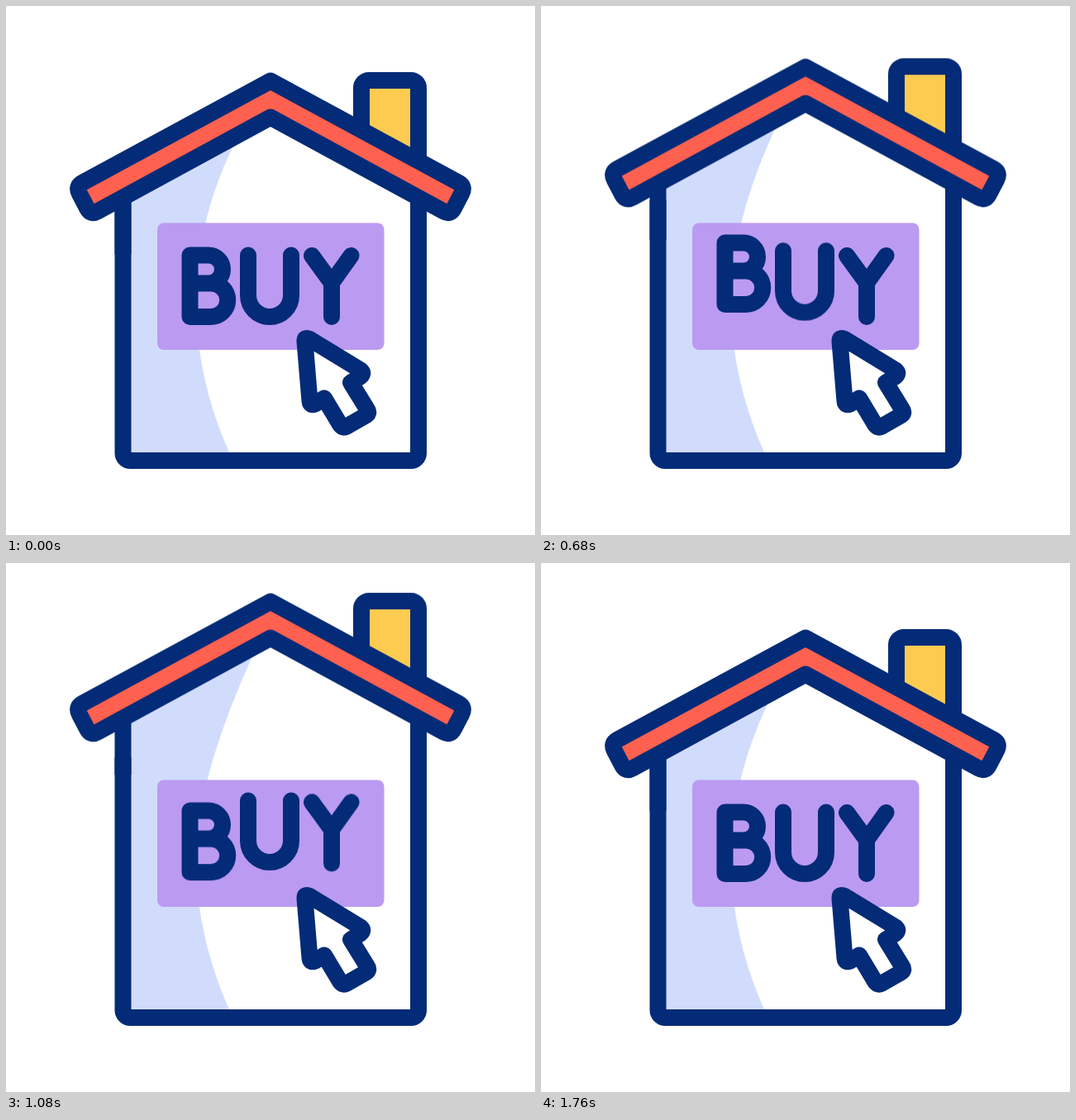
Write an HTML page without scripts that moves like this. It is 640 px wide and 640 px high and loops after 1960 ms.

```html
<!DOCTYPE html>
<html lang="en">
<head>
<meta charset="utf-8">
<title>Buy a house</title>
<style>
  html, body { margin: 0; width: 100%; height: 100%; overflow: hidden; background: #fff; }
  svg { display: block; width: 100%; height: 100%; }

  .line { fill: none; stroke: #042b77; stroke-width: 20; stroke-linecap: round; stroke-linejoin: round; }
  .flat { stroke-linecap: butt; }
  .red { fill: #ff6150; }
  .yellow { fill: #fdcb50; }
  .white { fill: #fff; }

  .move {
    --rise: -16px;
    animation: 1960ms cubic-bezier(.333, 0, .667, 1) infinite;
  }
  .roof { --rise: -50px; }
  .roof, .u { animation-name: lift; }
  .b { animation-name: lift-early; }
  .y { animation-name: lift-late; }
  .shade { fill: #d1dcfd; animation-name: stretch; }
  .cursor { transform-origin: 362px 402px; vector-effect: non-scaling-stroke; animation-name: click; }

  @keyframes lift {
    0%, 25%, 73.3%, 100% { transform: translateY(0); }
    50.1% { transform: translateY(var(--rise)); }
  }
  @keyframes lift-early {
    0%, 14.8%, 59.4%, 100% { transform: translateY(0); }
    38.3%, 39.3% { transform: translateY(var(--rise)); }
  }
  @keyframes lift-late {
    0%, 40.8%, 88.8%, 100% { transform: translateY(0); }
    61.2%, 65.3% { transform: translateY(var(--rise)); }
  }
  @keyframes click {
    0%, 4.1%, 28.6%, 100% { transform: scale(1); }
    16.3% { transform: scale(.7); }
  }
  @keyframes stretch {
    0%, 25%, 73.3%, 100% { d: path("M141 545H272L270 540Q230 450 230 358Q230 263 274 171L279 160L141 235Z"); }
    50.1% { d: path("M141 545H272L270 540Q230 450 230 358Q230 265 299 110L304 98L141 185Z"); }
  }
</style>
</head>
<body>
<svg viewBox="0 0 640 640" role="img" aria-label="House with a BUY button">
  <path class="move shade" d="M141 545H272L270 540Q230 450 230 358Q230 263 274 171L279 160L141 235Z"/>
  <rect x="183" y="262.5" width="274.5" height="153.5" rx="8" fill="#bb9af2"/>

  <path class="line flat" d="M141.5 235V541a9 9 0 0 0 9 9H490a9 9 0 0 0 9-9V235"/>
  <g class="move roof">
    <path class="line flat" d="M141.5 225V300M499 225V300"/>
    <path class="line flat yellow" d="M430 155V99a9 9 0 0 1 9-9H490a9 9 0 0 1 9 9V190"/>
    <path class="line red" d="M320 90.6L547.7 213.9Q555.6 218.2 551.4 226.5L541.7 245Q537.5 253 529.6 248.6L320 134.6L110.4 248.6Q102.5 253 98.3 245L88.6 226.5Q84.4 218.2 92.3 213.9Z"/>
  </g>

  <g class="line">
    <path class="move b" d="M222.5 335.5V301.5H245a17 17 0 0 1 0 34H222.5H248a20.2 20.2 0 0 1 0 40.4H222.5Z"/>
    <path class="move u" d="M293 301.5V350a26 26 0 0 0 52 0V301.5"/>
    <path class="move y" d="M370 302L394 335L417.5 302M394 335V376"/>
  </g>

  <path class="line white move cursor" d="M361.5 406Q361 400 367 402.8L429 440.5Q434 444.5 428 449L417 455.5L437 488Q440 492 436 495L411.5 509Q407.5 511 404.5 507L385 474.5L374 481.5Q368 484 367.5 478Z"/>
</svg>
</body>
</html>
```
